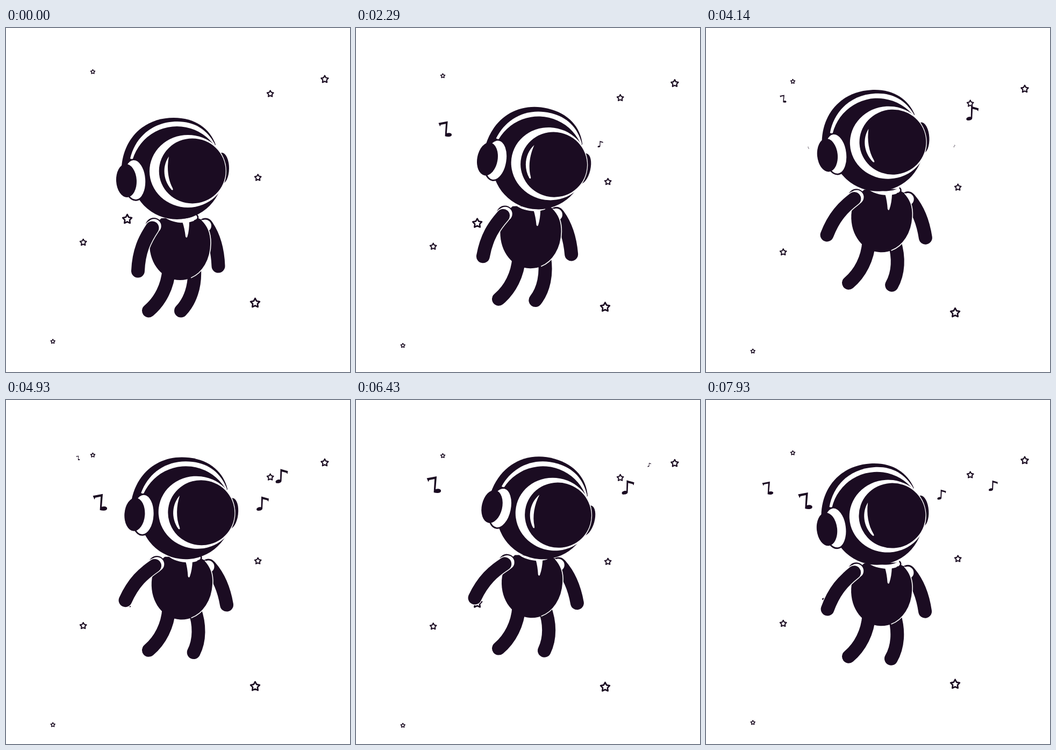
Animation, 640 px wide and 640 px high, one loop 8000 ms. Source, as an HTML page:

```html
<!DOCTYPE html>
<html lang="en">
<head>
<meta charset="utf-8">
<title>Astronaut with headphones</title>
<style>
  html, body { margin: 0; width: 100%; height: 100%; overflow: hidden; background: #fff; }
  svg { display: block; width: 100%; height: 100%; fill: #1b0c22; }
  .white { fill: #fff; }
  .ink, .gap { fill: none; stroke: #1b0c22; stroke-linecap: round; stroke-linejoin: round; }
  .gap { stroke: #fff; }
  .limb { stroke-width: 25; }
  .limb.gap { stroke-width: 28; }
</style>
</head>
<body>
<svg viewBox="0 0 640 640">
  <defs>
    <path id="armPath" d="M272 372C258 393 247 415 245.500 452"/>
    <path id="leftNote" d="M-13 -12L5.500 -15.500L3.500 8.500C8 7 13.500 8 13.500 11.500C13.500 15.500 7 16.500 0 14.500L1.500 -10.500L-8.500 -8.500L-10 -5Z"/>
    <path id="rightNote" d="M-2 -13.500L12 -9.500L11 -4L9 -6.500L.8 -8.500L0 9C-.5 12.500 -5 13 -8 13C-11.500 13 -12 9 -9 7.500C-7 6 -4 6 -2.500 6.500Z"/>
  </defs>
  <g id="stars" class="ink"></g>
  <g id="body">
    <path d="M303 450C301 480 287 508 265.500 526" class="ink limb"/>
    <path id="rightLeg" d="M350.500 450C352 480 343 508 325.500 526" class="ink limb"/>
    <g id="torso">
      <path id="rightArm" d="M374 369C388 390 394 415 395 443" class="ink limb"/>
      <circle cx="371" cy="367.500" r="14"/>
      <circle cx="370.500" cy="368" r="11.500" class="white"/>
      <path d="M289 354C275 366 267 384 267 402C267 440 292 469 324 469C356 469 381 440 381 400C381 380 375 368 364 357L350 350Z"/>
      <path d="M364 357C375 368 381 380 381 400C381 440 356 469 324 469" class="gap" stroke-width="1.600" pathLength="100" stroke-dasharray="86 100" style="stroke-linecap:butt"/>
      <path d="M294 351C312 357 342 357 354 347C359 352 357 357 351 358C338 365 308 364 294 351Z" class="white"/>
      <path d="M355 348C359 352 357 357 351 358.500" class="ink" stroke-width="2.500"/>
      <path d="M328 360L341 360C341 370 340 380 337.500 388Q336 392 334 388C333 378 331 369 328 360Z" class="white"/>
      <circle cx="275" cy="368.500" r="15.500"/>
      <circle cx="275.500" cy="368.500" r="13.200" class="white"/>
      <g id="leftArm">
        <use href="#armPath" class="gap limb"/>
        <use href="#armPath" class="ink limb"/>
      </g>
      <g id="head">
        <ellipse cx="401.500" cy="261" rx="13.500" ry="29"/>
        <path d="M215 258C219 205 257 167 312 167C352 167 379 187 390 217L318 270Z"/>
        <path d="M231 243C240 204 272 174 319 174C350 174 374 188 389 217L318 270Z" class="white"/>
        <ellipse cx="318" cy="269.500" rx="86" ry="86.500"/>
        <ellipse cx="338.500" cy="266.500" rx="71.500" ry="67.500" class="white"/>
        <ellipse cx="346.700" cy="266" rx="62" ry="60.500"/>
        <path d="M303 239C291 256 291 282 308 301Q312 303 310 298C301 281 299 260 303 239Z" class="white"/>
        <ellipse cx="239.500" cy="282.500" rx="21" ry="38" class="white" stroke="#1b0c22" stroke-width="2.800" transform="rotate(-4 239.500 282.500)"/>
        <ellipse cx="224" cy="284" rx="19" ry="31" transform="rotate(-3 224 284)"/>
      </g>
    </g>
  </g>
  <g id="notes"></g>
</svg>
<script>
const NS = 'http://www.w3.org/2000/svg';
const LOOP = 8000, FPS = 14;
const el = id => document.getElementById(id);

function add(parent, tag, attrs) {
  const node = document.createElementNS(NS, tag);
  for (const name in attrs) node.setAttribute(name, attrs[name]);
  return el(parent).appendChild(node);
}

function addStars(r, ...centres) {
  const corners = Array.from({ length: 10 }, (_, i) => {
    const a = i * Math.PI / 5 - Math.PI / 2, d = i % 2 ? r * 0.53 : r;
    return [d * Math.cos(a), d * Math.sin(a)];
  });
  for (const [x, y] of centres)
    add('stars', 'polygon', { points: corners, transform: `translate(${x} ${y})`, 'stroke-width': 0.5 + r * 0.25 });
}
addStars(4.2, [161.5, 81.5], [87.2, 583.2]);
addStars(6.2, [491.7, 122.5], [468.7, 278.5], [143.7, 399]);
addStars(7, [593, 95.5]);
addStars(8.8, [225.6, 355.8], [463.5, 511.8]);

// Each note drifts at its own speed while its rise slows by `curve`.
function addNote(birth, [x, y], [vx, vy], curve, life) {
  const left = vx < 0, fade = left ? 4 : 1.3;
  const node = add('notes', 'use', { href: left ? '#leftNote' : '#rightNote' });
  return t => {
    const age = t - birth;
    const size = Math.max(0, Math.min(1, age / 0.75, (life - age) / fade));
    node.style.display = size ? '' : 'none';
    node.setAttribute('transform',
      `translate(${x + vx * age} ${y + vy * age + curve * age * age}) scale(${size})`);
  };
}
const notes = [
  addNote(0.5, [187, 242], [-12, -30.3], 0, 5.5),
  addNote(4.06, [192, 227], [-20, -50], 8.7, 7),
  addNote(6.6, [209.5, 204], [-19, -12.4], 0, 7),
  addNote(1.95, [447, 229], [22, -39.4], 3.4, 4.85),
  addNote(4.03, [460, 224], [19, -39.9], 6, 4.85),
  addNote(7.4, [427, 196], [21, -40], 5, 4.85)
];

// Cosine ease; past 1 it swings back and forth.
const ease = p => (1 - Math.cos(Math.PI * p)) / 2;
const nod = t => t < 1.8 ? 14.7 * ease(t / 1.8) : -6.2 + 20.9 * ease((t - 3.9) / 2.1);

const place = (id, transform) => el(id).setAttribute('transform', transform);
const turn = (id, angle, x, y) => place(id, `rotate(${angle} ${x} ${y})`);

function draw(t) {
  const lift = ease((t + 0.07) / 6);
  place('stars', `translate(0 ${22.7 * lift})`);
  place('body', `translate(0 ${-65 * lift})`);
  turn('torso', 3.2 * lift, 323, 475);
  turn('leftArm', 20.3 * lift, 273, 369);
  turn('rightArm', -11.5 * lift, 371, 367);
  turn('rightLeg', -18.5 * lift, 351, 450);
  turn('head', nod(t), 313, 354);
  notes.forEach(move => move(t));
}

const start = performance.now();
function tick(now) {
  const ms = Math.max(0, now - start) % LOOP;
  draw(Math.floor(ms * FPS / 1000 + 0.08) / FPS);
  requestAnimationFrame(tick);
}
draw(0);
requestAnimationFrame(tick);
</script>
</body>
</html>
```
